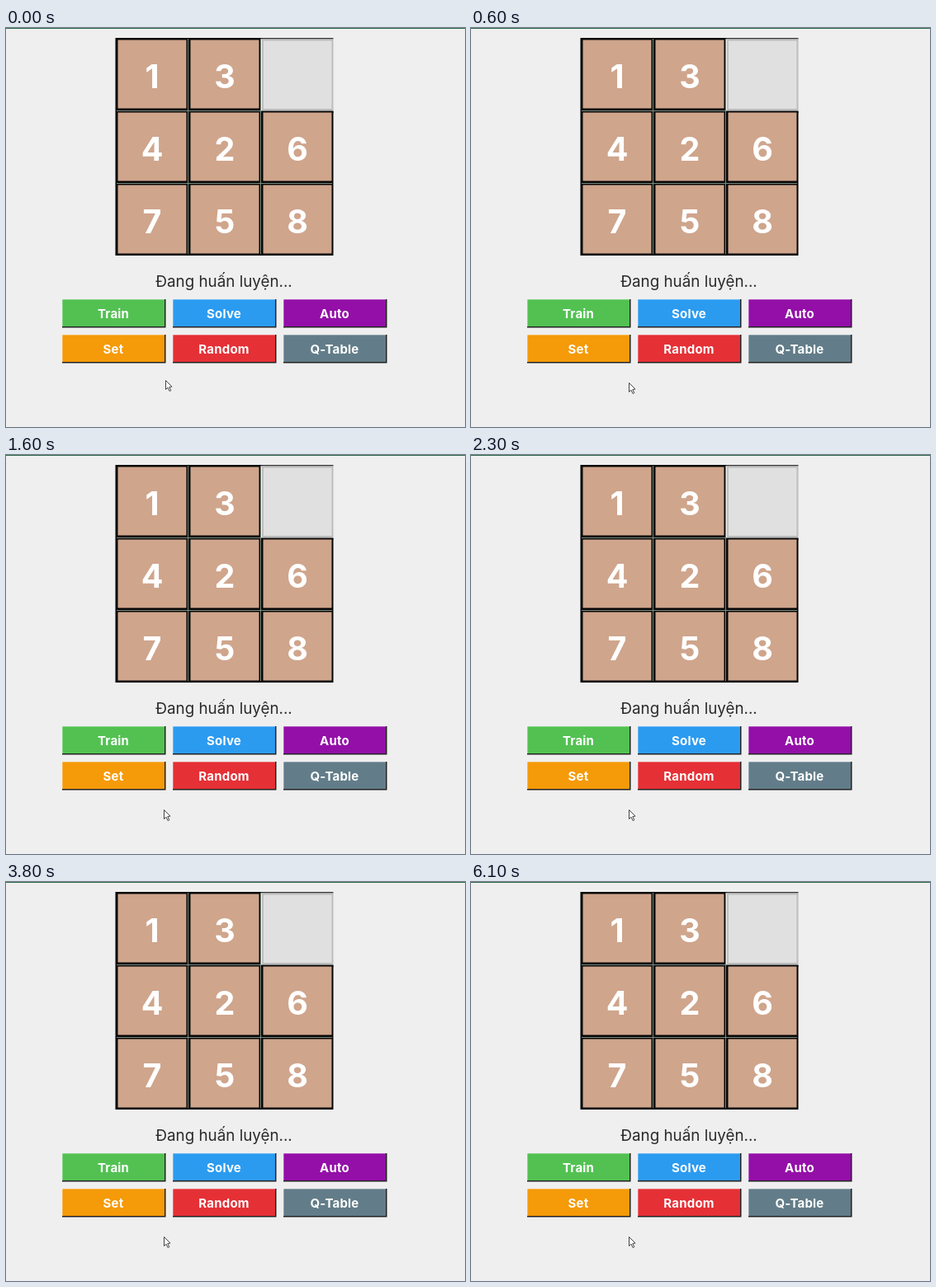
These frames come from a looping animation (556 px wide and 484 px high, 8 s). An HTML page with a canvas:

```html
<!DOCTYPE html>
<html lang="vi">
<head>
<meta charset="utf-8">
<style>
html, body { margin: 0; height: 100%; overflow: hidden; background: #efefef; }
canvas { display: block; }
</style>
</head>
<body>
<canvas id="stage" width="556" height="484"></canvas>
<script>
const ctx = document.getElementById('stage').getContext('2d');
const LOOP = 8000, STEP = 100;
const board = [[1, 3, 0], [4, 2, 6], [7, 5, 8]];
const buttons = [
  ['Train', '#52c152'], ['Solve', '#2b9bf0'], ['Auto', '#930fa8'],
  ['Set', '#f59a09'], ['Random', '#e53036'], ['Q-Table', '#627d89']
];

function box(x, y, w, h, color) {
  ctx.fillStyle = color;
  ctx.fillRect(x, y, w, h);
}

function label(text, x, y, weight, size, color, spacing = 0) {
  ctx.font = `${weight} ${size}px Inter, sans-serif`;
  ctx.letterSpacing = spacing + 'px';
  ctx.textAlign = 'center';
  ctx.fillStyle = color;
  ctx.fillText(text, x, y);
}

function drawBoard() {
  box(132.5, 12, 264, 264, '#050505');
  for (const i of [1, 2]) {
    box(132 + 88 * i, 13, 1, 261, '#7d8c80');
    box(134, 12 + 88 * i, 261, 1, '#7d8c80');
  }
  board.forEach((row, r) => row.forEach((n, c) => {
    const x = 135.5 + 88 * c, y = 14.5 + 88 * r;
    if (n) {
      box(x, y, 83, 83, '#cfa58c');
      label(n, x + 41.5, y + 58, 700, 39.5, '#fff');
    } else {
      box(x - 2.5, y - 2.5, 88, 89, '#efefef');
      box(x - 2.5, y - 2.5, 87.5, 1.5, '#333');
      box(x - 1.5, y - 1, 86.5, 86.5, '#bdbdbd');
      box(x + .5, y + 1, 82.5, 82.5, '#e0e0e0');
      box(x - 2.5, y + 86, 87.5, 2.5, '#050505');
    }
  }));
}

function drawButton([text, color], i) {
  const x = 68 + 134 * (i % 3), y = 329 + 43 * Math.floor(i / 3);
  box(x, y, 125.5, 34.5, '#222');
  box(x, y, 124, 33, color);
  box(x, y, 124, 1, 'rgba(255,255,255,.3)');
  box(x, y, 1, 33, 'rgba(255,255,255,.3)');
  label(text, x + 62, y + 23, 700, 15, '#fff', .2);
}

function drawCursor(t) {
  const k = Math.min(1, t / 200);
  ctx.save();
  ctx.translate(193.5 - 2 * k, 427.5 + 3 * k);
  ctx.beginPath();
  [[0, 0], [0, 11], [2.5, 8.7], [4.6, 13], [6.3, 12.2], [4.3, 8], [7.5, 7.6]]
    .forEach(([x, y]) => ctx.lineTo(x, y));
  ctx.closePath();
  ctx.fillStyle = '#fff';
  ctx.strokeStyle = '#444';
  ctx.fill();
  ctx.stroke();
  ctx.restore();
}

function draw(now) {
  const t = Math.floor(now % LOOP / STEP) * STEP;
  box(0, 0, 556, 484, '#efefef');
  box(0, 0, 556, 1, '#2e6e4c');
  drawBoard();
  label('Đang huấn luyện...', 264, 313.5, 400, 18.8, '#2a2a2a');
  buttons.forEach(drawButton);
  drawCursor(t);
  requestAnimationFrame(draw);
}
requestAnimationFrame(draw);
</script>
</body>
</html>
```
